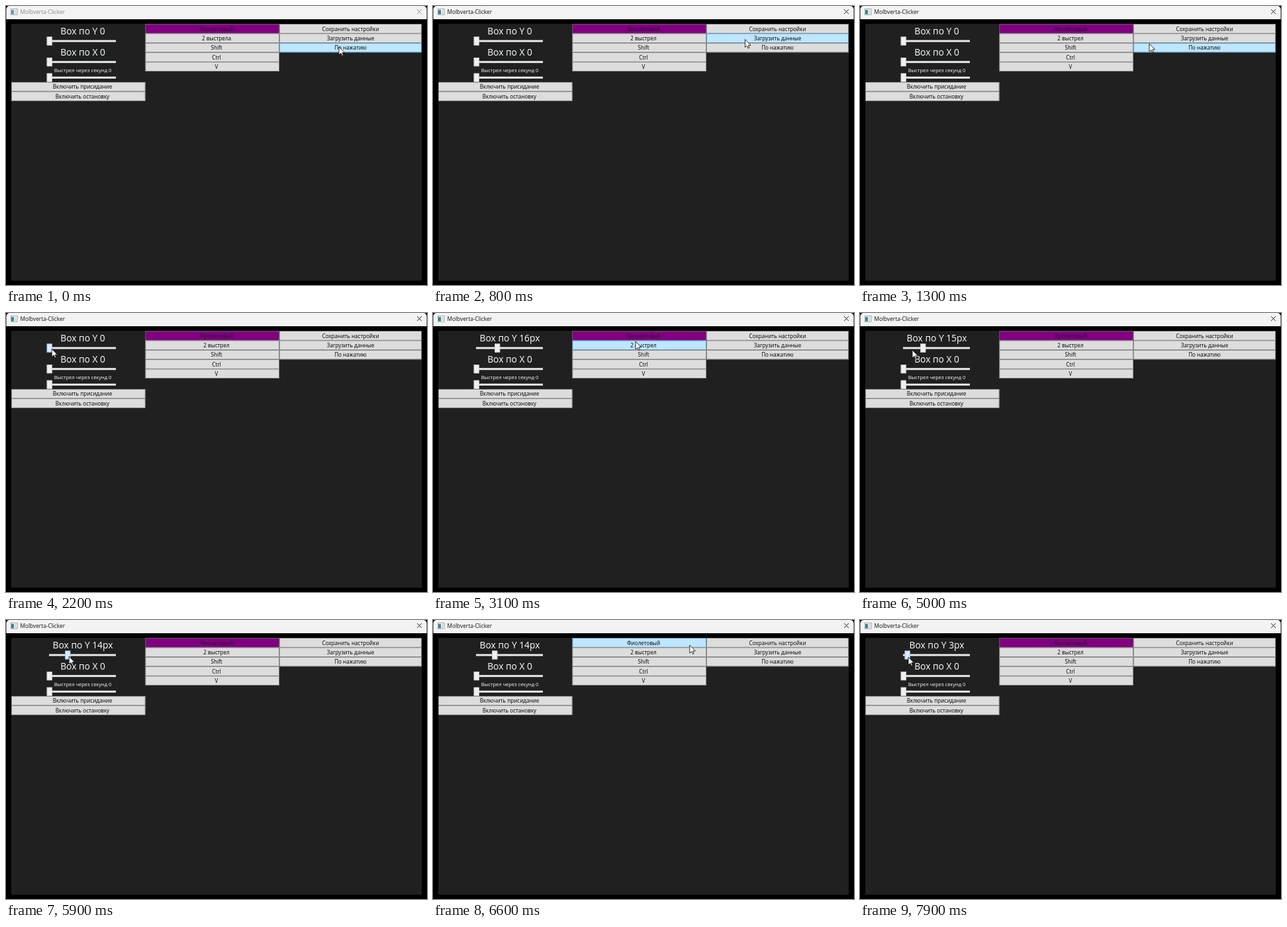
An HTML page with a canvas for the animation above (8 s loop, 636 by 422 pixels).

```html
<!DOCTYPE html>
<html lang="ru">
<head>
<meta charset="utf-8">
<style>
html, body { margin: 0; width: 100%; height: 100%; overflow: hidden; background: #000; }
canvas { display: block; }
</style>
</head>
<body>
<canvas id="stage" width="636" height="422"></canvas>
<script>
const ctx = document.getElementById('stage').getContext('2d');
const LOOP = 8000, STEP = 100, MAX_GLIDE = 700;
const ROW = 14.35, COLUMN_WIDTH = 215, PITCH = 202.5, LEFT = 8, TOP = 27.2;
const TRACK_X = 65.7, UNIT = 1.97;
const DRAG_UP = 2350, DRAG_DOWN = 7500, TRACK_CLICKS = [4700, 5300], LOAD_CLICK = 500;

const at = (x, y) => ({ x, y });
const save = at(478, 38), load = at(480, 49), track = at(79, 56);

// The pointer glides to each place and is there at the given time.
const route = [
  [0, at(503, 62)], [500, load], [1300, at(437, 57)], [1800, track],
  [DRAG_UP, at(67, 54)], [2700, at(98, 54)], [3100, at(306, 43)],
  [3600, save], [3800, load], [4600, track], [6500, at(371, 38)],
  [6900, save], [7400, at(94, 53)], [7900, at(73, 56)]
];

function pointerAt(t) {
  const next = route.findIndex(([time]) => time > t);
  if (next < 0) return route.at(-1)[1];
  const [leave, from] = route[next - 1], [arrive, to] = route[next];
  const glide = Math.min(MAX_GLIDE, arrive - leave);
  const p = Math.max(0, 1 - (arrive - t) / glide), ease = p * p * (3 - 2 * p);
  return at(from.x + (to.x - from.x) * ease, from.y + (to.y - from.y) * ease);
}

function sliderValue(t, mouse) {
  const dragged = Math.max(0, Math.round((mouse.x - TRACK_X - 0.8) / UNIT));
  if (t < DRAG_UP) return 0;
  if (t < 2700 || t >= DRAG_DOWN) return dragged;
  return 16 - TRACK_CLICKS.filter(click => t >= click).length;
}

function box(x, y, w, h, fill, stroke) {
  ctx.fillStyle = fill;
  ctx.fillRect(x, y, w, h);
  if (!stroke) return;
  ctx.strokeStyle = stroke;
  ctx.lineWidth = 0.73;
  ctx.strokeRect(x + 0.36, y + 0.36, w - 0.73, h - 0.73);
}

function text(str, x, y, size, color, align = 'center') {
  ctx.font = `${size}px "Open Sans", "Noto Sans", sans-serif`;
  ctx.textAlign = align;
  ctx.fillStyle = color;
  ctx.fillText(str, x, y + size * 0.36);
}

function buttons(column, y, labels, mouse) {
  const x = LEFT + column * PITCH;
  const width = column === 2 ? COLUMN_WIDTH : PITCH;
  labels.forEach((label, i) => {
    const top = y + i * ROW;
    const hover = mouse.x >= x && mouse.x < x + width && mouse.y >= top && mouse.y < top + ROW;
    const purple = label === 'Фиолетовый' && !hover;
    const fill = hover ? '#bee6fd' : purple ? '#800080' : '#dddddd';
    box(x, top, width, ROW, fill, hover ? '#3c7fb1' : '#707070');
    text(label, x + COLUMN_WIDTH / 2, top + ROW / 2 + 0.3, 8.1, purple ? 'rgba(0,0,0,.68)' : '#000');
  });
}

function slider(label, size, labelY, y, value, mouse) {
  text(label, 116, labelY, size, '#fff');
  box(65, y - 1.5, 101, 3, '#e7eaea');
  const x = TRACK_X + value * UNIT;
  const hover = Math.abs(mouse.x - x) < 4 && Math.abs(mouse.y - y) < 7;
  box(x - 4, y - 6.5, 8, 13, hover ? '#dcecfc' : '#f0f0f0', hover ? '#7eb4ea' : '#c4c4c4');
}

function titleBar(active) {
  ctx.fillStyle = '#f3f3f3';
  ctx.beginPath();
  ctx.roundRect(0.5, 0, 635, 20, [5, 5, 0, 0]);
  ctx.fill();
  box(7, 4, 10.5, 9.5, '#fafafa', '#858b90');
  box(8, 6, 4, 6.5, active ? '#3d8581' : '#6e9d9a');
  box(13, 6, 3.5, 6.5, '#d8dcde');
  text('Molbverta-Clicker', 21.5, 9.3, 8.3, active ? '#111' : '#8a8a8a', 'left');
  ctx.strokeStyle = active ? '#111' : '#888';
  ctx.lineWidth = 0.9;
  ctx.stroke(new Path2D('M621 5l7 7m0-7l-7 7'));
}

function drawPointer({ x, y }) {
  const arrow = new Path2D('M0 0V12L3 9.5L4.7 13.5L6.5 12.7L4.8 8.8H8.5Z');
  ctx.save();
  ctx.translate(x, y);
  ctx.fillStyle = '#fff';
  ctx.fill(arrow);
  ctx.strokeStyle = '#000';
  ctx.lineWidth = 0.8;
  ctx.stroke(arrow);
  ctx.restore();
}

function draw(t) {
  const mouse = pointerAt(t);
  const value = sliderValue(t, mouse);
  const loaded = t >= LOAD_CLICK;

  box(0, 0, 636, 422, '#000');
  titleBar(loaded);
  box(LEFT, 27, 620, 388.5, '#202020');

  slider(`Вох по Y ${value ? value + 'px' : 0}`, 13.8, 38, 53, value, mouse);
  slider('Вох по X 0', 13.8, 69.8, 84.7, 0, mouse);
  slider('Выстрел через секунд 0', 7.5, 97, 108.3, 0, mouse);

  buttons(0, 115, ['Включить присидание', 'Включить остановку'], mouse);
  buttons(1, TOP, ['Фиолетовый', loaded ? '2 выстрел' : '2 выстрела', 'Shift', 'Ctrl', 'V'], mouse);
  buttons(2, TOP, ['Сохранить настройки', 'Загрузить данные', 'По нажатию'], mouse);
  drawPointer(mouse);
}

const start = performance.now();
function frame() {
  const t = (performance.now() - start) % LOOP;
  draw(Math.floor(t / STEP) * STEP);
  requestAnimationFrame(frame);
}
frame();
</script>
</body>
</html>
```
